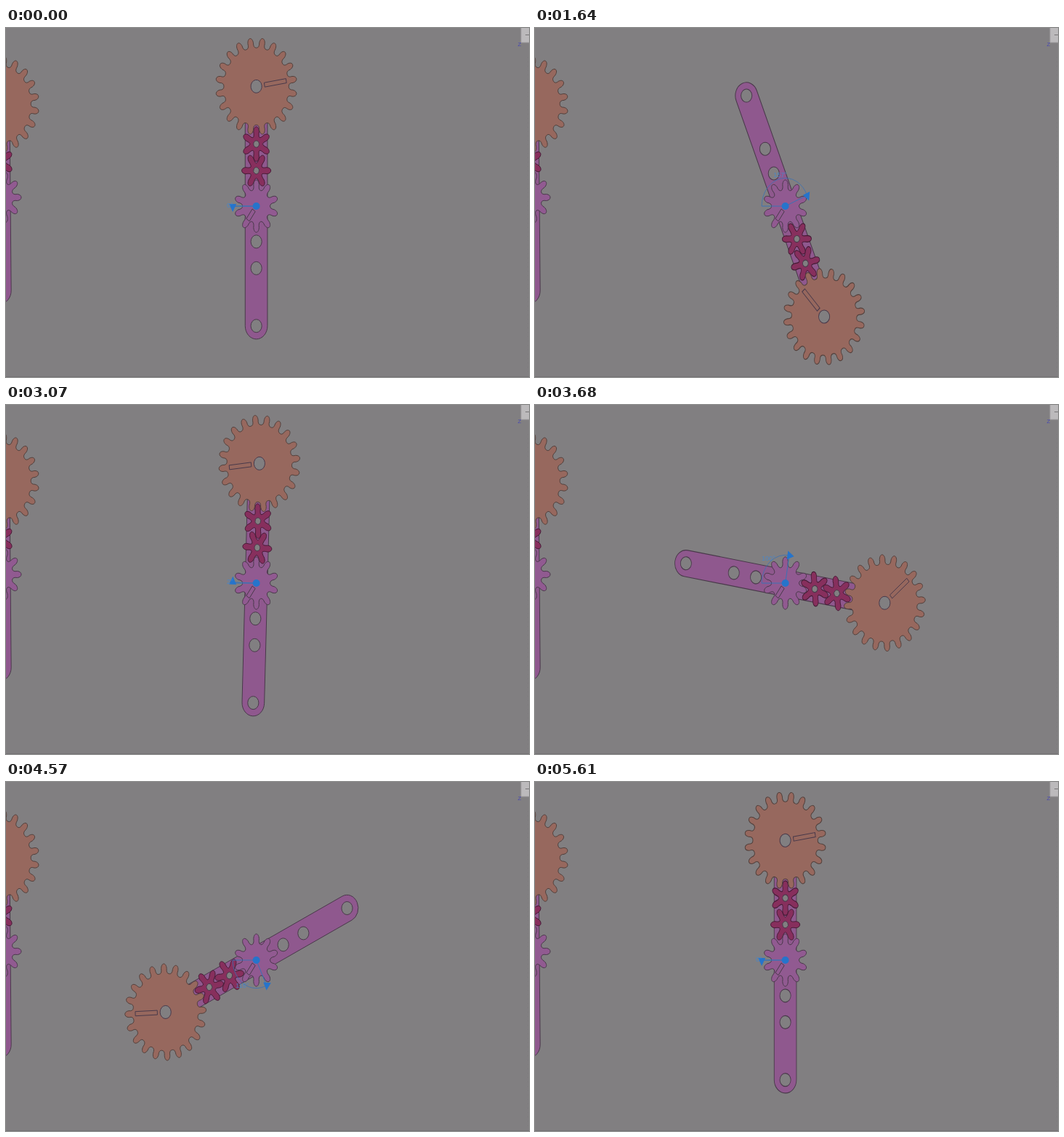
Write an HTML page that moves like this. It is 720 by 480 pixels and loops after 5650 ms.

```html
<!DOCTYPE html>
<html lang="en">
<head>
<meta charset="utf-8">
<title>Planetary gear arm</title>
<style>
  html, body { margin: 0; width: 100%; height: 100%; overflow: hidden; background: #817f81; }
  svg { display: block; width: 720px; height: 480px; }
  .part { stroke: #49394a; stroke-width: 1; }
  .arm { fill: #8f588e; }
  .sun { fill: #915a91; }
  .idler { fill: #872f5d; stroke: #451b35; }
  .wheel { fill: #97685e; stroke: #52403c; }
  .hole { fill: #817f81; }
  .slot { fill: none; }
  .part, .thin { vector-effect: non-scaling-stroke; }
  .thin { fill: none; stroke: #3a72b4; stroke-width: 1; }
  .blue { fill: #2674cb; }
  text { font-family: "Liberation Sans", Arial, sans-serif; }
</style>
</head>
<body>
<svg viewBox="0 0 720 480">
  <rect width="720" height="480" fill="#817f81"/>
  <g id="scene"></g>
  <text id="label" font-size="9" fill="#4488d0" opacity=".85" text-anchor="middle"></text>
  <rect x="709" y="0" width="11" height="20" fill="#bcbabc"/>
  <path d="M709 0V20H720" fill="none" stroke="#9b999b"/>
  <path d="M715 9.5H720" stroke="#777577"/>
  <text x="704.5" y="25" font-size="8" fill="#4a4ab0">Z</text>
  <path d="M718.5 40V478" stroke="#777577" stroke-dasharray="1 5" opacity=".5"/>
  <path d="M0 479.5H720" stroke="#737173"/>
</svg>
<script>
const LOOP = 5650, STEP = 35.7, START = 320;
const SQUASH = 0.842;          // horizontal scale of the view
const MODULE = 3.05;           // pitch radius per tooth
const PIVOT = { x: 344.6, y: 245 };
const DIAL = 38.6;             // radius of the angle readout

// [ms, arm angle in degrees]
const DRAG = [
  [0, 0], [320, 0], [440, 6], [640, 34.9], [860, 72], [1430, 135],
  [1640, 157.2], [2000, 206], [2430, 265.4], [3150, 374], [3680, 460.2],
  [4300, 553], [4570, 604.6], [4860, 654], [5200, 706], [5400, 720], [LOOP, 720]
];

const scene = document.getElementById('scene');
const label = document.getElementById('label');

function add(parent, tag, attrs) {
  const el = document.createElementNS('http://www.w3.org/2000/svg', tag);
  for (const key in attrs) el.setAttribute(key, attrs[key]);
  parent.appendChild(el);
  return el;
}

function turn(el, y, deg) {
  el.setAttribute('transform', `translate(0 ${y}) rotate(${deg})`);
}

// Point at an angle measured clockwise from straight up
function polar(r, deg) {
  const a = deg * Math.PI / 180;
  return [r * Math.sin(a), -r * Math.cos(a)];
}

// Gear outline with one tooth pointing straight up
function gearPath(teeth) {
  const pitch = teeth * MODULE, root = pitch - 8, base = pitch - 1;
  const ctrl = base + 6.5 / 0.75, w = 4.5, half = 180 / teeth;
  const valley = deg => polar(root, deg).map(n => n.toFixed(2)).join(' ');
  let d = 'M' + valley(-half);
  for (let i = 0; i < teeth; i++) {
    const mid = i * 2 * half, a = mid * Math.PI / 180;
    const at = (u, r) => {
      const x = u * Math.cos(a) + r * Math.sin(a);
      const y = u * Math.sin(a) - r * Math.cos(a);
      return `${x.toFixed(2)} ${y.toFixed(2)} `;
    };
    d += `Q${at(-w * 0.75, root)}${at(-w, base)}`;
    d += `C${at(-w * 0.85, ctrl)}${at(w * 0.85, ctrl)}${at(w, base)}`;
    d += `Q${at(w * 0.75, root)}${valley(mid + half)}`;
  }
  return d + 'Z';
}

function gear(parent, kind, teeth, hole, slot) {
  const g = add(parent, 'g', {});
  add(g, 'path', { d: gearPath(teeth), class: 'part ' + kind });
  if (hole) add(g, 'circle', { r: hole, class: 'part hole' });
  if (slot) {
    add(g, 'rect', {
      x: -3, y: -slot[1], width: 6, height: slot[1] - slot[0], class: 'part slot'
    });
  }
  return g;
}

function train(x, y, idlerCount) {
  const root = add(scene, 'g', { transform: `translate(${x} ${y}) scale(${SQUASH} 1)` });
  const arm = add(root, 'g', {});
  const reach = MODULE * (30 + 12 * idlerCount);
  add(arm, 'rect', {
    x: -18.2, y: -reach - 18.2, width: 36.4, height: 2 * reach + 36.4, rx: 18.2, class: 'part arm'
  });
  const idlers = [];
  for (let i = 0; i < idlerCount; i++) {
    const offset = MODULE * (16 + 12 * i);
    add(arm, 'circle', { cy: offset, r: 9, class: 'part hole' });
    idlers.push({ el: gear(arm, 'idler', 6, 4.6), y: -offset });
  }
  add(arm, 'circle', { cy: reach, r: 9, class: 'part hole' });
  const wheel = gear(arm, 'wheel', 20, 9, [13.5, 49.5]);
  const sun = gear(root, 'sun', 10, 0, [7, 23.5]);
  return { root, arm, idlers, wheel, sun, reach };
}

const side = train(-9.3, 233, 1);
turn(side.arm, 0, -0.6);
turn(side.idlers[0].el, side.idlers[0].y, 0);
turn(side.wheel, -side.reach, 261);
turn(side.sun, 0, 234);

const main = train(PIVOT.x, PIVOT.y, 2);
turn(main.sun, 0, 216);
const arc = add(main.root, 'path', { class: 'thin', opacity: 0.8 });
const rays = add(main.root, 'path', { class: 'thin' });
const tip = add(main.root, 'path', { class: 'blue', d: 'M-5 -6L6 0L-5 6Z' });
add(scene, 'circle', { cx: PIVOT.x, cy: PIVOT.y, r: 5, class: 'blue' });

function armAngle(t) {
  let i = 1;
  while (i < DRAG.length - 1 && DRAG[i][0] < t) i++;
  const [t0, a0] = DRAG[i - 1], [t1, a1] = DRAG[i];
  return a0 + (a1 - a0) * (t - t0) / (t1 - t0);
}

function drawDial(angle) {
  const swing = angle % 360;
  const signed = swing > 180 ? swing - 360 : swing;
  const dir = signed > 0 ? 1 : -1;
  const from = polar(DIAL, 270), to = polar(DIAL, 270 + signed);
  arc.setAttribute('d', `M${from}A${DIAL} ${DIAL} 0 0 ${dir > 0 ? 1 : 0} ${to}`);
  rays.setAttribute('d', `M${from}L0 0L${to}`);
  const heading = 270 + signed + (dir > 0 ? 0 : 180);
  const nudge = polar(DIAL, 270 + signed + dir * 3);
  tip.setAttribute('transform', `translate(${nudge}) rotate(${heading})`);
  const [lx, ly] = polar(43, 270 + signed / 2);
  label.setAttribute('x', PIVOT.x + lx * SQUASH);
  label.setAttribute('y', PIVOT.y + ly + 2);
  label.textContent = Math.round(Math.abs(signed)) + '°';
}

function draw(t) {
  const step = Math.floor((t - START) / STEP + 0.15);
  const angle = step < 0 ? 0 : armAngle(Math.min(START + step * STEP, LOOP));
  turn(main.arm, 0, angle);
  // Gear angles are relative to the arm; the sun stays fixed.
  turn(main.idlers[0].el, main.idlers[0].y, 30 + angle * 10 / 6);
  turn(main.idlers[1].el, main.idlers[1].y, -angle * 10 / 6);
  turn(main.wheel, -main.reach, 81 + angle * 10 / 20);
  drawDial(angle);
}

const begin = performance.now();
function frame() {
  draw((performance.now() - begin) % LOOP);
  requestAnimationFrame(frame);
}
frame();
</script>
</body>
</html>
```
